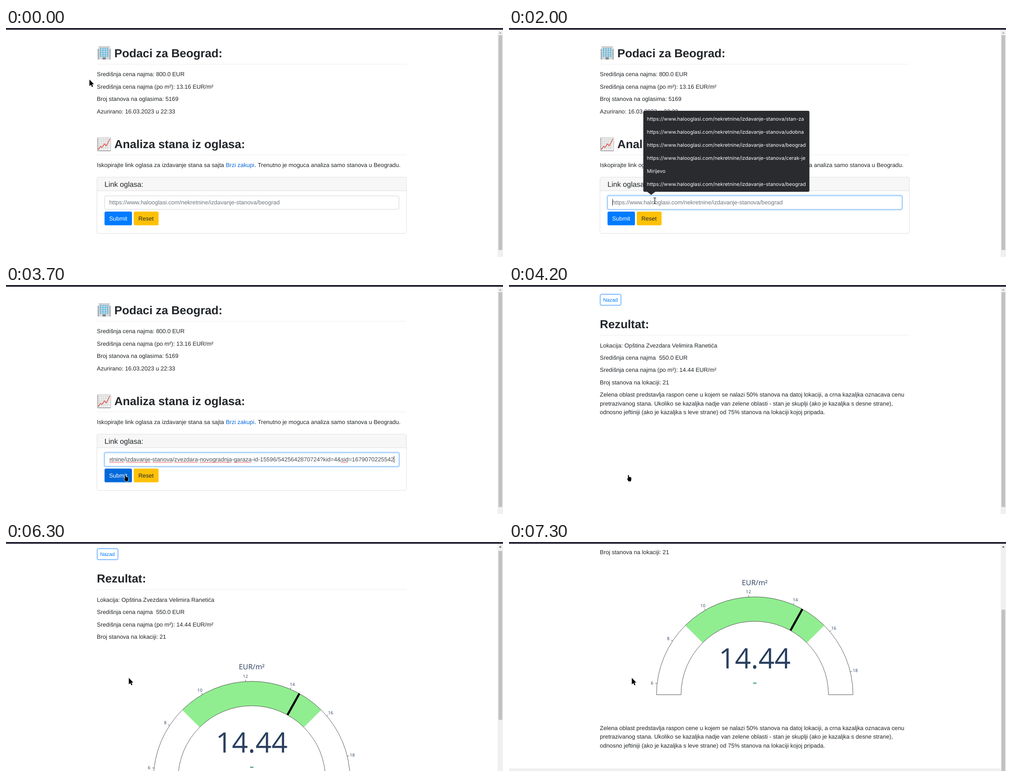
An HTML page for the animation above (8 s loop, 1101 by 509 pixels).

```html
<!DOCTYPE html>
<html lang="sr">
<head>
<meta charset="utf-8">
<title>Analiza stana</title>
<style>
html, body { margin: 0; width: 100%; height: 100%; overflow: hidden; background: #fff; }
svg { display: block; width: 1101px; height: 509px; }
text { font: 12.9px "Liberation Sans", Arial, sans-serif; fill: #212529; text-rendering: geometricPrecision; white-space: pre; }
.h { font-size: 25.8px; font-weight: bold; }
.hr { fill: #eaecef; }
.link { fill: #0366d6; }
.input { fill: #fff; stroke: #ced4da; }
.hint { fill: #6c757d; }
.plot text { font-family: "Open Sans", sans-serif; fill: #2a3f5f; text-anchor: middle; }
#popup text { font: 11.05px Inter, sans-serif; fill: #fbfbfe; }
.pointer path { paint-order: stroke; stroke: #fff; stroke-width: 1.4; stroke-linejoin: round; }
</style>
</head>
<body>
<svg viewBox="0 0 1101 509">
  <defs>
    <clipPath id="field"><rect x="229" y="374" width="632" height="28"/></clipPath>
    <clipPath id="list"><rect x="305" y="184" width="352.3" height="180"/></clipPath>
  </defs>

  <g id="home">
    <g id="building">
      <path d="M203 46h4v24h-4zM228 46h4v24h-4z" fill="#a9b0b4"/>
      <path d="M206 41h23v29h-23z" fill="#d5d8da"/>
      <path d="M205 41h25v2h-25z" fill="#b9bec1"/>
      <path d="M214 65h7v5h-7z" fill="#7d8a92"/>
    </g>
    <text class="h" x="240" y="65">Podaci za Beograd:</text>
    <rect class="hr" x="201" y="80" width="686" height="1"/>
    <text x="201.3" y="107.3">Središnja cena najma: 800.0 EUR</text>
    <text x="201.3" y="134.7">Središnja cena najma (po m²): 13.16 EUR/m²</text>
    <text x="201.3" y="162.1">Broj stanova na oglasima: 5169</text>
    <text x="201.3" y="189.5">Azurirano: 16.03.2023 u 22:33</text>

    <g fill="none">
      <path d="M203 244h29v29h-29z" fill="#f4f4f4" stroke="#b5b5b5"/>
      <path d="M207.5 244v29m4.5-29v29m4.5-29v29m4.5-29v29m4.5-29v29M203 248.5h29m-29 4.5h29m-29 4.5h29m-29 4.5h29m-29 4.5h29" stroke="#c4c4c4" stroke-width=".8"/>
      <path d="M203.5 244v29h28.5" stroke="#808080"/>
      <path d="M204.5 270l5-7 3 2.5 5.500-8 4 4.500 3.500-6 4.500-9.500" stroke="#e0483a" stroke-width="1.5"/>
    </g>
    <text class="h" x="240" y="267">Analiza stana iz oglasa:</text>
    <rect class="hr" x="201" y="281.300" width="686" height="1"/>
    <text x="201.300" y="309">Iskopirajte link oglasa za izdavanje stana sa sajta <tspan class="link" x="487">Brzi zakupi</tspan><tspan x="550.800">. Trenutno je moguca analiza samo stanova u Beogradu.</tspan></text>

    <rect x="201.500" y="331.500" width="685.500" height="125" rx="3.200" fill="#fff"/>
    <path d="M202 362v-27.500q0-3 3-3h679q3 0 3 3v27.500z" fill="#f7f7f7"/>
    <rect x="201.500" y="361.300" width="685.500" height="1" fill="#dfdfdf"/>
    <rect x="201.500" y="331.500" width="685.500" height="125" rx="3.200" fill="none" stroke="#dfdfdf"/>
    <text x="218.300" y="352.700" style="font-size:16.1px">Link oglasa:</text>

    <rect id="glow" x="216.200" y="370.500" width="656.600" height="35" rx="5" fill="#bfdeff"/>
    <rect class="input" x="218.500" y="373" width="652" height="30" rx="3.200"/>
    <rect id="ring" class="input" x="218.500" y="373" width="652" height="30" rx="3.200" style="stroke:#80bdff"/>
    <text id="hint" class="hint" x="228.700" y="392">https://www.halooglasi.com/nekretnine/izdavanje-stanova/beograd</text>
    <g id="pasted" clip-path="url(#field)">
      <text x="859.500" y="392" text-anchor="end" style="fill:#495057">nekretnine/izdavanje-stanova/zvezdara-novogradnja-garaza-id-15596/5425642870724?kid=4&amp;sid=1679070225542</text>
      <path id="waves" fill="none" stroke="#e0262d" stroke-width=".9"/>
    </g>
    <rect id="caret" y="380" width="1" height="15" fill="#333"/>

    <rect id="submit" x="218.300" y="408" width="60.700" height="30.600" rx="3.200"/>
    <text x="228.500" y="427.600" style="fill:#fff">Submit</text>
    <rect x="283" y="408" width="55" height="30.600" rx="3.200" fill="#ffc107"/>
    <text x="293.300" y="427.600">Reset</text>
  </g>

  <g id="result">
    <rect x="202" y="20.500" width="46" height="24.500" rx="2.600" fill="#fff" stroke="#007bff"/>
    <text x="208.400" y="36.600" style="font-size:11.3px;fill:#007bff">Nazad</text>
    <text class="h" x="201.300" y="96">Rezultat:</text>
    <rect class="hr" x="201" y="111" width="686" height="1"/>
    <text x="201.300" y="138.600">Lokacija: Opština Zvezdara Velimira Ranetića</text>
    <text x="201.300" y="166">Središnja cena najma&#160; 550.0 EUR</text>
    <text x="201.300" y="193.400">Središnja cena najma (po m²): 14.44 EUR/m²</text>
    <text x="201.300" y="220.800">Broj stanova na lokaciji: 21</text>

    <g id="gauge" class="plot" transform="translate(544.4 533)">
      <path id="band" fill="#90ee90"/>
      <path id="arch" fill="none" stroke="#444" stroke-width=".9"/>
      <path id="needle" stroke="#000" stroke-width="4.600"/>
      <path id="ticks" stroke="#444" stroke-width=".9"/>
      <text y="-244" style="font-size:16.1px">EUR/m²</text>
      <text y="-59" style="font-size:62.4px">14.44</text>
      <text y="-18" style="font-size:31px;fill:#3d9970">-</text>
    </g>

    <g id="note">
      <text x="201.300" y="611.200">Zelena oblast predstavlja raspon cene u kojem se nalazi 50% stanova na datoj lokaciji, a crna kazaljka oznacava cenu</text>
      <text x="201.300" y="630.600">pretrazivanog stana. Ukoliko se kazaljka nadje van zelene oblasti - stan je skuplji (ako je kazaljka s desne strane),</text>
      <text x="201.300" y="650">odnosno jeftiniji (ako je kazaljka s leve strane) od 75% stanova na lokaciji kojoj pripada.</text>
    </g>
    <rect id="footer" y="696.700" width="1089" height="60" fill="#efefef"/>
  </g>

  <g id="popup">
    <path d="M300.500 184h362q3 0 3 3v174q0 3-3 3h-338.500l-9 7-9-7h-5.500q-3 0-3-3v-174q0-3 3-3z" fill="#2a2b2f"/>
    <g id="items" clip-path="url(#list)"></g>
  </g>

  <rect x="1089" width="12" height="509" fill="#f0f0f0"/>
  <rect id="thumb" x="1091" width="8.300" fill="#c1c1c1"/>
  <path id="up" d="M1092 12.200l3-3.200 3 3.200z"/>
  <rect width="1101" height="4" fill="#2b2a39"/>

  <g class="pointer">
    <path id="arrow" d="M0 0V14.500L3.400 11.500 5.700 16.500 8 15.500 5.800 10.600H10z"/>
    <path id="beam" d="M-3-7h2.300l.7.600.7-.6H3v1H.6V6H3v1H.7L0 6.400-.7 7H-3V6h2.400V-6H-3z"/>
    <path id="hand" d="M2 1.500q1.300-1.400 2.200.2V5l4 .8q1.300.4 1.300 2V11l-1.300 4H3.300L.4 10Q-.2 8.300 2 8.800z"/>
  </g>
</svg>
<script>
const $ = id => document.getElementById(id);
const show = (id, on) => $(id).style.display = on ? '' : 'none';
const add = (parent, tag, attrs, text = '') => {
  const el = document.createElementNS('http://www.w3.org/2000/svg', tag);
  for (const k in attrs) el.setAttribute(k, attrs[k]);
  el.textContent = text;
  $(parent).append(el);
};

// Windows of the building icon
for (let i = 0; i < 20; i++)
  add('building', 'rect', { x: 208 + i % 4 * 5.2, y: 45 + (i >> 2) * 4, width: 3.2, height: 2.6, fill: '#45b5e6' });

// Suggestions
const site = 'https://www.halooglasi.com/nekretnine/izdavanje-stanova/';
[site + 'stan-za', site + 'udobna', site + 'beograd', site + 'cerak-je', 'Mirijevo', site + 'beograd']
  .forEach((s, i) => add('items', 'text', { x: 305.6, y: 205.9 + 29 * i }, s));

// Spell-check underlines
let waves = '';
for (const [a, b] of [[226, 262], [266, 321], [325, 369], [373, 425], [429, 501], [505, 545], [742, 759]]) {
  waves += `M${a} 395`;
  for (let x = a + 1.6, up = 1; x <= b; x += 1.6, up ^= 1) waves += `L${x} ${up ? 393.6 : 395}`;
}
$('waves').setAttribute('d', waves);

// Gauge: angles in degrees from the vertical
const R = 217.7, r = 163.3;
const at = (deg, rad) => [rad * Math.sin(deg * Math.PI / 180), -rad * Math.cos(deg * Math.PI / 180)];
const angle = value => (value - 12.263) * 13.32;
const ring = (a, b) => `M${at(a, R)}A${R} ${R} 0 0 1 ${at(b, R)}L${at(b, r)}A${r} ${r} 0 0 0 ${at(a, r)}Z`;
const spoke = (value, from, to) => `M${at(angle(value), from)}L${at(angle(value), to)}`;
$('band').setAttribute('d', ring(-45, 45));
$('arch').setAttribute('d', ring(-90, 90));
$('needle').setAttribute('d', spoke(14.44, r, R));
let ticks = '';
for (let v = 6; v <= 18; v += 2) {
  ticks += spoke(v, R, R + 4);
  const [x, y] = at(angle(v), 229);
  add('gauge', 'text', { x, y: y + 3.5, style: 'font-size:9.7px' }, v);
}
$('ticks').setAttribute('d', ticks);

// Last entry whose time has come
const latest = (t, list) => list.filter(e => t >= e[0]).pop();

function pointer(t) {
  if (t < 3700) {
    const k = Math.min(9, Math.max(0, Math.floor((t - 600) / 100))) / 9;
    const e = k * k * (3 - 2 * k);
    const y = 114.5 + 269.5 * e;
    return [y > 374 ? 'beam' : 'arrow', 184.8 + 138.2 * e, y];
  }
  if (t < 4900) return ['hand', 261.5, 421.5];
  const [, x, y] = latest(t, [[4900, 261.6, 421.6], [5100, 273.6, 387.6], [5300, 271.8, 335.6], [5500, 271.8, 307.6], [5700, 272, 302]]);
  return ['arrow', x, y];
}

function draw(t) {
  const home = t < 4200, focus = t >= 1900, pasted = t >= 2400, plotted = t >= 4400;
  show('home', home);
  show('result', !home);

  const lit = focus ? t < 2000 ? 0.5 : 1 : 0;
  $('glow').style.opacity = $('ring').style.opacity = lit;
  show('hint', !pasted);
  show('pasted', pasted);
  show('caret', focus);
  $('caret').setAttribute('x', pasted ? 859.3 : 229);
  $('submit').setAttribute('fill', t >= 3700 ? '#0069d9' : '#007bff');

  const [, alpha, scale] = latest(t, [[0, 0, 1], [1900, 0.5, 0.987], [2000, 1, 1], [2500, 0.78, 0.987], [3700, 0, 1]]);
  show('popup', alpha);
  $('popup').style.opacity = alpha;
  $('popup').setAttribute('transform', `translate(481.5 274) scale(${scale}) translate(-481.5 -274)`);

  const [, scroll] = latest(t, [[0, 0], [6300, 5.7], [6600, 50], [7300, 193.5]]);
  $('result').setAttribute('transform', `translate(0 ${-scroll})`);
  show('gauge', plotted);
  show('footer', plotted);
  $('note').setAttribute('transform', `translate(0 ${plotted ? 0 : -363})`);
  $('thumb').setAttribute('y', 16 + scroll * 0.695);
  $('thumb').setAttribute('height', plotted ? 375.5 : 477.5);
  $('up').setAttribute('fill', scroll ? '#505050' : '#a3a3a3');

  const [kind, x, y] = pointer(t);
  for (const id of ['arrow', 'beam', 'hand']) show(id, id === kind);
  $(kind).setAttribute('transform', `translate(${x} ${y})`);
}

const start = performance.now();
function tick() {
  draw((performance.now() - start) % 8000);
  requestAnimationFrame(tick);
}
tick();
</script>
</body>
</html>
```
